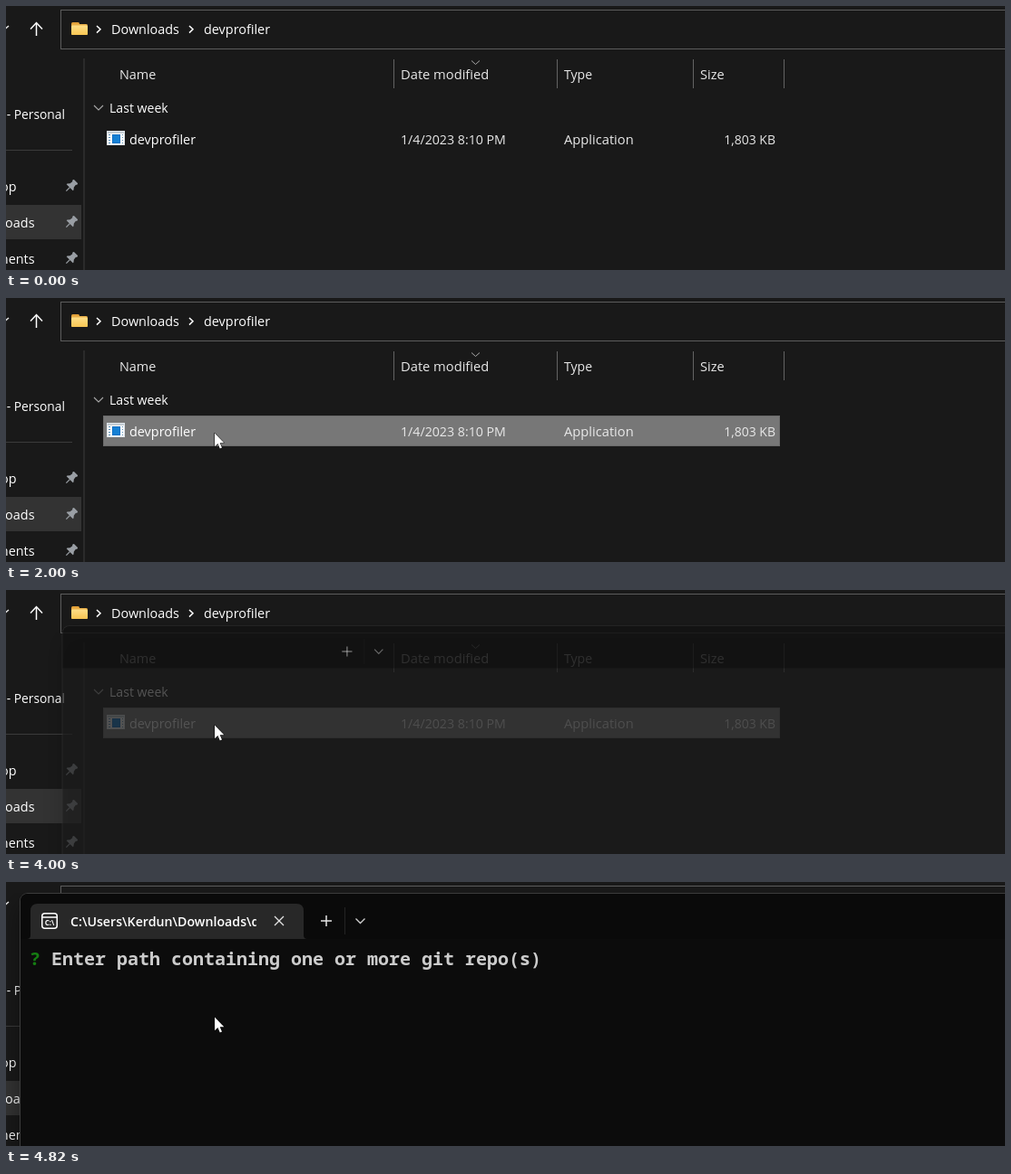
These frames come from a looping animation (1101 px wide and 292 px high, 4.95 s). An HTML page with a canvas:

```html
<!DOCTYPE html>
<html lang="en">
<head>
<meta charset="utf-8">
<title>Opening a console program</title>
<style>
  html, body { margin: 0; width: 100%; height: 100%; overflow: hidden; background: #191919; }
  canvas { display: block; width: 1101px; height: 292px; }
</style>
</head>
<body>
<canvas id="stage" width="1101" height="292"></canvas>
<script>
const W = 1101, H = 292, LOOP = 4950;
const ctx = document.getElementById('stage').getContext('2d');
const UI = '"Open Sans", sans-serif';
const MONO = '"Noto Sans Mono", monospace';
const DETAIL = '#e8e8e8';

// Pointer hotspot: [start time, x, y], held until the next entry.
const pointerPath = [
  [410, 670, 250], [480, 634, 225],
  [810, 592, 215], [880, 452, 184], [950, 324, 160], [1030, 277, 154],
  [1100, 253, 152], [1160, 240, 151], [1230, 232, 150], [1300, 229, 150],
  [1430, 229, 148]
];
const between = (t, a, b) => t >= a && t < b;
const clamp = v => Math.max(0, Math.min(1, v));

function rect(x, y, w, h, color) {
  ctx.fillStyle = color;
  ctx.fillRect(x, y, w, h);
}

function round(x, y, w, h, r, color) {
  ctx.fillStyle = color;
  ctx.beginPath();
  ctx.roundRect(x, y, w, h, r);
  ctx.fill();
}

function line(points, color, width = 1) {
  ctx.strokeStyle = color;
  ctx.lineWidth = width;
  ctx.beginPath();
  points.forEach(([x, y]) => ctx.lineTo(x, y));
  ctx.stroke();
}

function polygon(points, fill, stroke) {
  ctx.beginPath();
  points.forEach(([x, y]) => ctx.lineTo(x, y));
  ctx.closePath();
  if (stroke) {
    ctx.strokeStyle = stroke;
    ctx.lineWidth = 1;
    ctx.stroke();
  }
  ctx.fillStyle = fill;
  ctx.fill();
}

function text(str, x, y, { size = 14.4, color = '#fff', align = 'left', weight = 400, family = UI } = {}) {
  ctx.font = `${weight} ${size}px ${family}`;
  ctx.textAlign = align;
  ctx.fillStyle = color;
  ctx.fillText(str, x, y);
}

function drawPin(x, y) {
  ctx.save();
  ctx.translate(x, y);
  ctx.rotate(Math.PI / 4);
  round(-3.5, -7, 7, 2.5, 1, '#9a9fa5');
  polygon([[-2.5, -5], [2.5, -5], [3, -1], [5, 1.5], [5, 2.5], [-5, 2.5], [-5, 1.5], [-3, -1]], '#9a9fa5');
  line([[0, 2], [0, 8]], '#9a9fa5', 1.3);
  ctx.restore();
}

function drawFolder() {
  round(72, 18, 9, 8, 1.5, '#e3a23a');
  round(72, 20, 18, 12, 1.5, '#e9b04a');
  const front = ctx.createLinearGradient(0, 21, 0, 32);
  front.addColorStop(0, '#ffe08a');
  front.addColorStop(1, '#f8c653');
  round(72, 21.5, 18, 10.5, 1.5, front);
}

function drawAppIcon() {
  rect(111, 138, 20, 16, '#dfe5ea');
  rect(112, 139, 18, 2, '#c3ccd3');
  rect(112, 141, 18, 12, '#f8fafb');
  rect(117, 142, 9, 10, '#0f70c4');
  rect(118, 143, 7, 8, '#1580d4');
  for (let i = 0; i < 4; i++) {
    rect(113, 142 + i * 3, 2, 1, '#5e8fb4');
    rect(128, 142 + i * 3, 1, 1, '#5e8fb4');
  }
}

function drawSidebar() {
  line([[-3, 27], [3, 22]], '#e8e8e8', 1.4);
  line([[33.5, 33], [33.5, 19]], '#fff', 1.5);
  line([[27, 25.5], [33.5, 18.5], [40, 25.5]], '#fff', 1.5);

  rect(0, 220, 83, 38, '#333');
  rect(0, 159, 73, 1, '#3b3b3b');
  rect(85, 58, 2, H, '#2a2a2a');
  text('- Personal', 65, 125, { size: 13.8, align: 'right' });
  text('Desktop', 11.5, 205, { align: 'right' });
  text('Downloads', 31.5, 245, { align: 'right' });
  text('Documents', 31.5, 285, { align: 'right' });
  [199, 239, 279].forEach(y => drawPin(72, y));
}

function drawRow(t) {
  if (t >= 1850) {
    rect(107, 130, 746, 34, '#777');
    ctx.strokeStyle = '#6a6a6a';
    ctx.lineWidth = 1;
    ctx.strokeRect(107.5, 130.5, 745, 33);
  } else if (t >= 1030) {
    ctx.globalAlpha = clamp((t - 960) / 140);
    round(106, 129, 747, 35, 2, '#4d4c4c');
    ctx.globalAlpha = 1;
  }
  drawAppIcon();
  text('devprofiler', 136, 153);
  text('1/4/2023 8:10 PM', 435, 153, { size: 14.2, color: DETAIL });
  text('Application', 615, 153, { size: 14.7, color: DETAIL });
  text('1,803 KB', 848, 153, { size: 14, color: DETAIL, align: 'right' });
}

function drawExplorer(t) {
  rect(0, 0, W, H, '#191919');
  drawSidebar();

  ctx.strokeStyle = '#5c5c5c';
  ctx.lineWidth = 1;
  ctx.strokeRect(60.5, 4.5, W, 43);
  drawFolder();
  [100, 202].forEach(x => line([[x, 22], [x + 4, 25.8], [x, 29.6]], '#fff', 1.5));
  text('Downloads', 116, 31);
  text('devprofiler', 218, 31);

  const head = { color: DETAIL };
  text('Name', 125, 81, head);
  text('Date modified', 435, 81, { ...head, size: 14.7 });
  text('Type', 615, 81, { ...head, size: 14.1 });
  text('Size', 765, 81, { ...head, size: 14.6 });
  [427, 607, 757, 857].forEach(x => rect(x, 59, 1, 32, '#636363'));
  line([[513, 60.5], [517.5, 64.5], [522, 60.5]], '#a8a8a8');

  line([[97, 110], [102, 115], [107, 110]], '#a8a8a8', 1.1);
  text('Last week', 114, 118, { size: 14.1 });
  drawRow(t);
}

function drawTab(t) {
  ctx.fillStyle = '#282828';
  ctx.beginPath();
  ctx.moveTo(23, 63);
  ctx.quadraticCurveTo(27, 63, 27, 59);
  ctx.lineTo(27, 32);
  ctx.quadraticCurveTo(27, 24, 35, 24);
  ctx.lineTo(320, 24);
  ctx.quadraticCurveTo(328, 24, 328, 32);
  ctx.lineTo(328, 59);
  ctx.quadraticCurveTo(328, 63, 332, 63);
  ctx.fill();
  line([[296, 38], [306, 48]], '#e4e4e4', 1.2);
  line([[306, 38], [296, 48]], '#e4e4e4', 1.2);
  if (t < 4560) return;

  ctx.strokeStyle = '#fff';
  ctx.lineWidth = 1.5;
  ctx.beginPath();
  ctx.roundRect(39.75, 34.75, 16.5, 16.5, 3);
  ctx.stroke();
  line([[40, 39], [56, 39]], '#fff', 1.5);
  text('C:\\', 48, 48, { size: 8, weight: 700, align: 'center' });

  ctx.save();
  ctx.beginPath();
  ctx.rect(70, 26, 206, 34);
  ctx.clip();
  text('C:\\Users\\Kerdun\\Downloads\\devprofiler.exe', 71, 49, { size: 14.2, weight: 600 });
  ctx.restore();
}

function drawTerminal(t) {
  const step = t < 4070 ? 0 : t < 4140 ? 1 : 2;
  const scale = [0.93, 0.98, 1][step];
  ctx.save();
  ctx.beginPath();
  ctx.rect(0, 12, W, H);
  ctx.clip();
  ctx.globalAlpha = [0.45, 0.85, 1][step];
  ctx.translate(680, 400);
  ctx.scale(scale, scale);
  ctx.translate(-680, -400);

  ctx.shadowColor = 'rgba(0,0,0,0.4)';
  ctx.shadowBlur = 26;
  ctx.shadowOffsetY = 12;
  round(15, 12, 1330, 776, 9, '#3c3c3c');
  ctx.shadowColor = 'transparent';
  round(16, 13, 1328, 774, 8, '#0c0c0c');
  round(16, 13, 1328, 50, [8, 8, 0, 0], '#0a0a0a');

  line([[347, 43], [359, 43]], '#e6e6e6', 1.5);
  line([[353, 37], [353, 49]], '#e6e6e6', 1.5);
  rect(373, 28, 1, 30, '#242424');
  line([[385.5, 40.5], [390.5, 45.5], [395.5, 40.5]], '#d0d0d0', 1.3);

  if (t >= 4300) drawTab(t);
  if (t >= 4490) {
    const prompt = { size: 20, weight: 600, family: MONO };
    text('?', 26, 92, { ...prompt, color: '#157d12' });
    text('Enter path containing one or more git repo(s)', 50, 92, { ...prompt, color: '#ccc' });
  }
  if (between(t, 4560, 4820)) rect(602, 75, 1, 22, '#ccc');
  ctx.restore();
}

function drawSpinner(t) {
  const x = 243.5, y = 148.5;
  const turn = Math.floor((t - 2300) / 73) * 0.75;
  const ring = ctx.createConicGradient(turn, x, y);
  ring.addColorStop(0, '#0b63b5');
  ring.addColorStop(0.55, '#1f9be6');
  ring.addColorStop(0.9, '#8ddcff');
  ring.addColorStop(1, '#0b63b5');
  ctx.strokeStyle = ring;
  ctx.lineWidth = 3;
  ctx.beginPath();
  ctx.arc(x, y, 5.8, 0, Math.PI * 2);
  ctx.stroke();
}

function drawPointer(t) {
  const spot = pointerPath.filter(p => p[0] <= t).pop();
  if (!spot) return;
  const [, x, y] = spot;
  ctx.save();
  ctx.translate(x + 1, y + 1);
  polygon([[0, 0.5], [0, 15.3], [3.4, 12], [5.8, 17.4], [8, 16.4], [5.7, 11.2], [10.3, 11.2]], '#fff', '#000');
  ctx.restore();

  if (between(t, 2300, 3250)) drawSpinner(t);
  if (between(t, 1710, 1850) || between(t, 1920, 2000)) {
    ctx.fillStyle = 'rgba(255,255,0,0.47)';
    ctx.beginPath();
    ctx.arc(x, y, 15, 0, Math.PI * 2);
    ctx.fill();
  }
}

function frame() {
  const t = performance.now() % LOOP;
  drawExplorer(t);
  if (t >= 4000) drawTerminal(t);
  drawPointer(t);
  requestAnimationFrame(frame);
}
frame();
</script>
</body>
</html>
```
